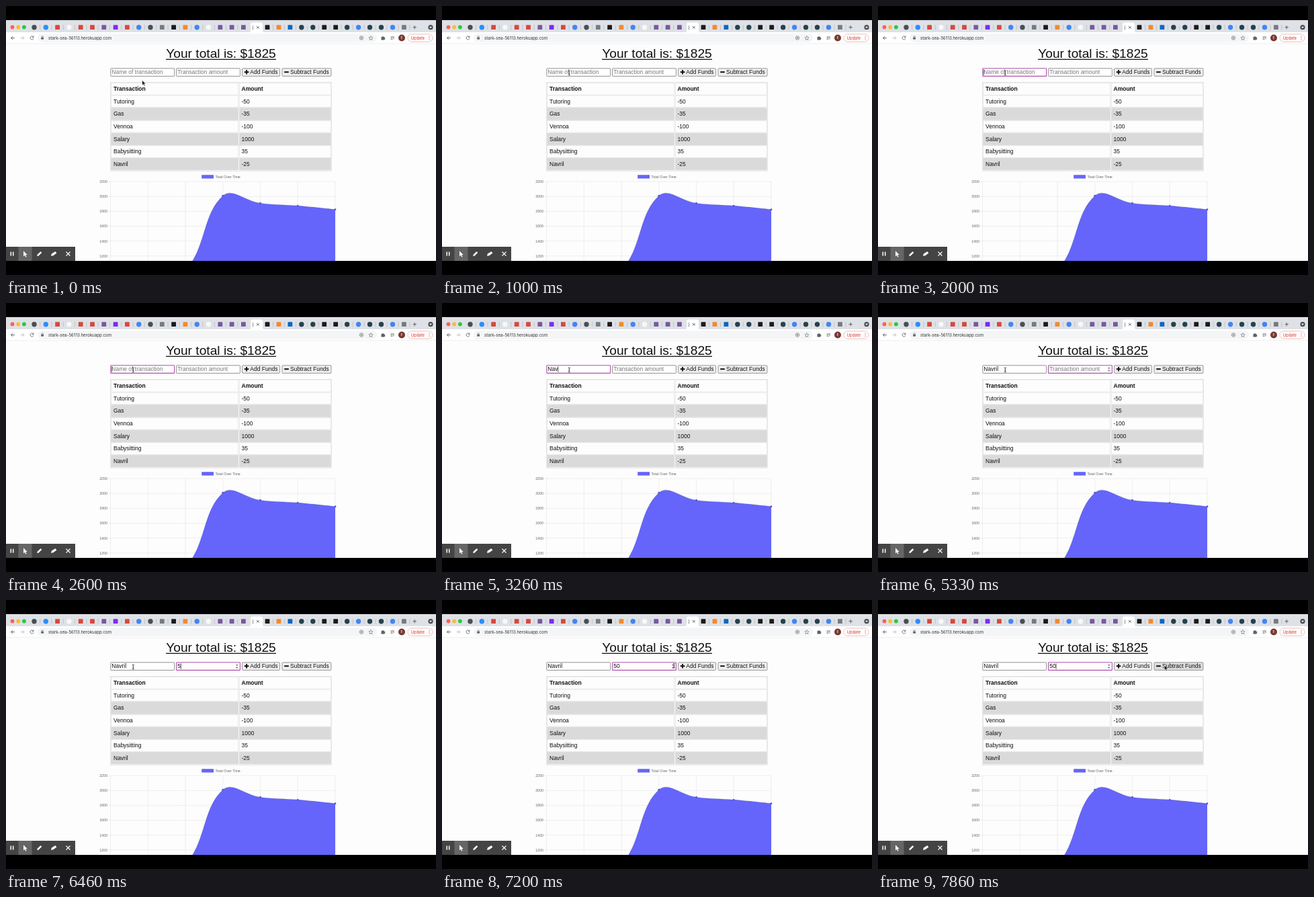
Recreate the animation shown at these times as an HTML page. Size 640x400 px, loop 8 s.

```html
<!DOCTYPE html>
<html lang="en">
<head>
<meta charset="utf-8">
<title>Budget tracker</title>
<style>
html, body { margin: 0; width: 100%; height: 100%; overflow: hidden; background: #000; }
svg { display: block; width: 100vw; height: 100vh; }
text { font-family: "Liberation Sans", Arial, sans-serif; font-size: 8.5px; fill: #111; white-space: pre; }
.ui { font-family: Inter, Roboto, sans-serif; font-size: 6.2px; fill: #333; }
.small { font-size: 5.33px; fill: #666; }
.hint { fill: #777; }
</style>
</head>
<body>
<svg id="stage" viewBox="0 0 640 400" xmlns="http://www.w3.org/2000/svg">
  <rect width="640" height="400"/>
  <rect y="21" width="640" height="358" fill="#fdfdfd"/>
  <rect y="21" width="640" height="18.5" fill="#dee1e6"/>
  <rect y="39" width="640" height="17" fill="#fff"/>
  <path d="M0 55.8H640" stroke="#dcdee1" stroke-width=".5"/>
  <g id="tabs"></g>
  <g id="toolbar" fill="none" stroke="#5f6368" stroke-width=".9">
    <rect x="47" y="41.3" width="505" height="12.4" rx="6.2" fill="#f4f5f6" stroke="none"/>
    <path d="M13 47.5H7.5M10 45L7.5 47.5L10 50"/>
    <path d="M21.5 47.5H27M24.5 45L27 47.5L24.5 50" stroke="#bbbec2"/>
    <path d="M40.6 45.9A2.5 2.5 0 1 0 41 48.2M41 44.6V46.6H39"/>
    <rect x="52.2" y="46.6" width="3.8" height="3" fill="#5f6368" stroke="none"/>
    <path d="M53 46.6V45.8A1.1 1.1 0 0 1 55.200 45.8V46.6" stroke-width=".6"/>
    <circle cx="529" cy="47.500" r="2.7" stroke-width=".7"/>
    <path d="M527.500 47.500h3M529 46v3" stroke-width=".7"/>
    <path d="M543 44.500l.9 2.100 2.200.2-1.700 1.500.5 2.200-1.900-1.200-1.900 1.200.5-2.200-1.700-1.500 2.200-.2z" stroke-width=".6"/>
    <path d="M558.500 46h1.500a1 1 0 0 1 2 0h1.500v1.500a1 1 0 0 1 0 2v1h-5z" fill="#5f6368" stroke="none"/>
    <path d="M572.500 45.800h5M572.500 47.600h3M572.500 49.400h3M577 46v3.500" stroke-width=".8"/>
    <circle cx="589" cy="47.500" r="5" fill="#77382f" stroke="none"/>
    <rect x="598" y="41.800" width="37" height="11.400" rx="5.700" fill="#fff" stroke="#e9a19b" stroke-width=".7"/>
    <g fill="#d93025" stroke="none"><circle cx="630" cy="45.200" r=".6"/><circle cx="630" cy="47.500" r=".6"/><circle cx="630" cy="49.800" r=".6"/></g>
  </g>
  <text class="ui" x="63" y="49.700">stark-sea-56113.herokuapp.com</text>
  <text class="ui" x="589" y="49.300" text-anchor="middle" style="font-size:5px;fill:#fff">E</text>
  <text class="ui" x="602.500" y="49.700" style="font-size:6px;fill:#d93025">Update</text>

  <text x="320" y="77" text-anchor="middle" style="font-size:19.200px">Your total is: $1825</text>
  <path d="M238 79.300H402" stroke="#111" stroke-width="1.300"/>

  <g id="form" stroke-width=".8">
    <rect id="nameBox" x="155.800" y="92.800" width="94.800" height="11.600" rx=".7" fill="#fff"/>
    <rect id="sumBox" x="253.600" y="92.800" width="94.800" height="11.600" rx=".7" fill="#fff"/>
    <rect id="addBtn" x="351.500" y="92.800" width="56" height="11.600" rx="1" stroke="#858585"/>
    <rect id="subBtn" x="411" y="92.800" width="73" height="11.600" rx="1" stroke="#858585"/>
  </g>
  <text id="nameText" x="157.300" y="101.300"></text>
  <text id="sumText" x="255.200" y="101.300"></text>
  <path id="caret" stroke="#111" stroke-width=".7"/>
  <path id="spin" d="M342 97.400l1.700-2.200 1.700 2.200zM342 99.700l1.700 2.200 1.700-2.200z" fill="#666"/>
  <path d="M354.800 98.300h6.600M358.100 95v6.600M414.200 98.300h6.600" stroke="#111" stroke-width="1.900"/>
  <text x="363.300" y="101.300">Add Funds</text>
  <text x="423" y="101.300">Subtract Funds</text>

  <g id="table"></g>
  <g id="chart"></g>

  <rect y="358" width="103" height="21" fill="#444"/>
  <rect x="18.500" y="358" width="20" height="21" fill="#666"/>
  <g fill="#fff" stroke="#fff">
    <path d="M7.300 365.500v6M10.700 365.500v6" stroke-width="1.500"/>
    <path d="M26 364.300v8l1.900-1.700 1.300 2.800 1.300-.6-1.300-2.700h2.500z" stroke="none"/>
    <path d="M46.200 372l.6-2.400 4.700-4.700 1.800 1.800-4.700 4.700z" stroke="none"/>
    <path d="M67 371.800l.8-3.400 5.600-3.400 2 2.600-5.300 3.700z" stroke="none"/>
    <path d="M89.500 365.500l6 6M95.500 365.500l-6 6" stroke-width="1.100"/>
  </g>

  <path id="arrow" d="M0 0V7.200L1.700 5.700L2.900 8.400L4.100 7.900L2.900 5.300H5.200Z" fill="#111" stroke="#fff" stroke-width=".5"/>
  <path id="beam" d="M-1.500-3.400Q0-3.400 0-2.500Q0-3.400 1.500-3.400M0-2.500V2.500M-1.500 3.400Q0 3.400 0 2.500Q0 3.400 1.500 3.400M-.8 .8H.8" fill="none" stroke="#222" stroke-width=".8"/>
</svg>
<script>
const LOOP = 8000;
const STORE = "Navril";
const $ = id => document.getElementById(id);

function add(parent, tag, attrs, text) {
  const el = document.createElementNS("http://www.w3.org/2000/svg", tag);
  for (const k in attrs) el.setAttribute(k, attrs[k]);
  if (text !== undefined) el.textContent = text;
  parent.appendChild(el);
  return el;
}

function drawTabs() {
  const g = $("tabs");
  ["#fd5f57", "#febc2e", "#28c840"].forEach((fill, i) =>
    add(g, "circle", { cx: 9.5 + i * 8.700, cy: 31.500, r: 2.900, fill }));
  const colors = {
    d: "#4b4f54", b: "#2d8cff", r: "#d8483d", w: "#f8f8f8", p: "#79589f", v: "#7a2bf5",
    g: "#4285f4", k: "#1b1b1b", o: "#f28a30", l: "#0a66c2", t: "#24424c", s: "#777b80"
  };
  const round = "dbwgt";
  const icon = (key, x) => round.includes(key)
    ? add(g, "circle", { cx: x, cy: 31.700, r: 3.700, fill: colors[key] })
    : add(g, "rect", { x: x - 3.400, y: 28.300, width: 6.800, height: 6.800, rx: .6, fill: colors[key] });
  const line = x => add(g, "path", { d: `M${x} 28V35.500`, stroke: "#a5a9ae", "stroke-width": .5 });

  [..."dbrwrrpvrgdskogwppp"].forEach((key, i) => {
    const x = 42 + i * 17.300;
    icon(key, x);
    if (i < 18) line(x + 8.700);
  });
  [..."kolttkktgttgs"].forEach((key, i) => {
    const x = 389 + i * 16.950;
    icon(key, x);
    line(x + 8.500);
  });
  add(g, "path", { d: "M361.500 39.500Q364 39 364 36.500V27.500Q364 24.500 367 24.500H379Q382 24.500 382 27.500V36.500Q382 39 384.500 39.500Z", fill: "#fff" });
  add(g, "text", { class: "ui", x: 366.500, y: 34, style: "font-size:6px" }, "[");
  add(g, "path", { d: "M373 30l3.600 3.600M376.600 30l-3.600 3.600M605.500 31.700h5.400M608.200 29v5.400", stroke: "#555", "stroke-width": .9 });
  add(g, "circle", { cx: 632, cy: 31.700, r: 3.600, fill: "#4b4f54" });
  add(g, "path", { d: "M630 30.800h4l-2 2.500z", fill: "#fff" });
}

function drawTable() {
  const g = $("table");
  const rows = [["Transaction", "Amount"], ["Tutoring", -50], ["Gas", -35], ["Vennoa", -100],
    ["Salary", 1000], ["Babysitting", 35], [STORE, -25]];
  add(g, "rect", { x: 155.300, y: 113.600, width: 329, height: 132, fill: "none", stroke: "#dedede", "stroke-width": .7 });
  rows.forEach((row, i) => {
    const y = 114.400 + i * 18.650;
    const fill = i && i % 2 === 0 ? "#dadada" : "#fdfdfd";
    const box = { y, height: 17.700, fill, stroke: "#d9d9d9", "stroke-width": .6 };
    add(g, "rect", { x: 156.300, width: 189.500, ...box });
    add(g, "rect", { x: 347.200, width: 136.300, ...box });
    const weight = i ? 400 : 700;
    row.forEach((cell, c) =>
      add(g, "text", { x: c ? 350.500 : 160, y: y + 11.700, "font-weight": weight }, cell));
  });
}

function drawChart() {
  const g = $("chart");
  const defs = add(g, "clipPath", { id: "page" });
  add(defs, "rect", { y: 246, width: 640, height: 133 });
  const plot = add(g, "g", { "clip-path": "url(#page)" });
  const px = i => 155.500 + i * 55.750;
  const py = v => 371.700 - (v - 1200) * .1105;

  add(g, "rect", { x: 291.200, y: 251.200, width: 17.800, height: 5.300, fill: "#6565fb" });
  add(g, "text", { class: "small", x: 311.500, y: 255.800 }, "Total Over Time");
  const grid = { stroke: "#e4e4e4", "stroke-width": .6 };
  for (let v = 2200; v >= 1200; v -= 200) {
    add(plot, "path", { d: `M151.500 ${py(v)}H490`, ...grid });
    add(plot, "text", { class: "small", x: 151, y: py(v) + 1.900, "text-anchor": "end" }, v);
  }
  for (let i = 0; i < 7; i++) add(plot, "path", { d: `M${px(i)} 261.200V379`, ...grid });

  const pts = [975, 1010, 2010, 1910, 1875, 1825].map((v, i) => [px(i + 1), py(v)]);
  // Smooth spline with a tension of 0.4, weighted by segment length.
  const handles = pts.map((p, i) => {
    const a = pts[i - 1] || p, b = pts[i + 1] || p;
    const before = Math.hypot(p[0] - a[0], p[1] - a[1]);
    const after = Math.hypot(b[0] - p[0], b[1] - p[1]);
    const at = k => [p[0] + k * (b[0] - a[0]), p[1] + k * (b[1] - a[1])];
    const edge = i === 0 || i === pts.length - 1;
    return edge ? [p, p] : [at(-.4 * before / (before + after)), at(.4 * after / (before + after))];
  });
  const curve = pts.slice(1).map((p, i) => `C${handles[i][1]} ${handles[i + 1][0]} ${p}`).join("");
  add(plot, "path", { d: `M${pts[0]}${curve}V420H${pts[0][0]}Z`, fill: "#6565fb" });
  add(plot, "path", { d: `M${pts[0]}${curve}`, fill: "none", stroke: "#000", "stroke-opacity": .1, "stroke-width": 1.200 });
  pts.forEach(p => add(plot, "circle", { cx: p[0], cy: p[1], r: 1.400, fill: "#5555c8" }));
}

const nameKeys = [2660, 2860, 3060, 3530, 3660, 3800];
const sumKeys = [6200, 6600];
const CLICK = 1600, TAB = 4530;
const actions = [CLICK, ...nameKeys, TAB, ...sumKeys];

const typed = (keys, word, t) => word.slice(0, keys.filter(k => k <= t).length);
const ease = (t, a, b) => {
  const u = Math.min(1, Math.max(0, (t - a) / (b - a)));
  return u * u * (3 - 2 * u);
};
const show = (el, on) => el.setAttribute("visibility", on ? "visible" : "hidden");

function setField(el, value, hint) {
  const text = value || hint;
  if (el.textContent !== text) el.textContent = text;
  el.setAttribute("class", value ? "" : "hint");
}

function setBox(el, focused, idle) {
  el.setAttribute("stroke", focused ? "#b04fae" : idle);
  el.setAttribute("stroke-width", focused ? 1.100 : .8);
}

function render(t) {
  const name = typed(nameKeys, STORE, t), sum = typed(sumKeys, "50", t);
  const onName = t >= CLICK && t < TAB, onSum = t >= TAB;
  setField($("nameText"), name, "Name of transaction");
  setField($("sumText"), sum, "Transaction amount");
  setBox($("nameBox"), onName, "#777");
  setBox($("sumBox"), onSum, "#777");
  show($("spin"), onSum);

  const last = actions.filter(a => a <= t).pop();
  const field = onSum ? $("sumText") : $("nameText");
  const value = onSum ? sum : name;
  const x = +field.getAttribute("x") + (value ? field.getComputedTextLength() + .4 : 0);
  $("caret").setAttribute("d", `M${x} 94.300V102.800`);
  show($("caret"), last !== undefined && (t - last) % 1000 < 500);

  const a = ease(t, 60, 1000), b = ease(t, 6800, 7460);
  const mx = 202.700 - 13.400 * a + 237 * b, my = 110.500 - 11 * a - 2.500 * b;
  const over = (l, r) => mx > l && mx < r && my > 92.500 && my < 104.500;
  const inField = over(155.500, 250.800) || over(253.300, 348.500);
  for (const id of ["arrow", "beam"]) $(id).setAttribute("transform", `translate(${mx} ${my})`);
  show($("beam"), inField);
  show($("arrow"), !inField);
  $("addBtn").setAttribute("fill", over(351, 408) ? "#dcdcdc" : "#efefef");
  $("subBtn").setAttribute("fill", over(410.500, 484.500) ? "#dcdcdc" : "#efefef");
}

drawTabs();
drawTable();
drawChart();
const start = performance.now();
function tick(now) {
  render(Math.max(0, now - start) % LOOP);
  requestAnimationFrame(tick);
}
render(0);
requestAnimationFrame(tick);
</script>
</body>
</html>
```
